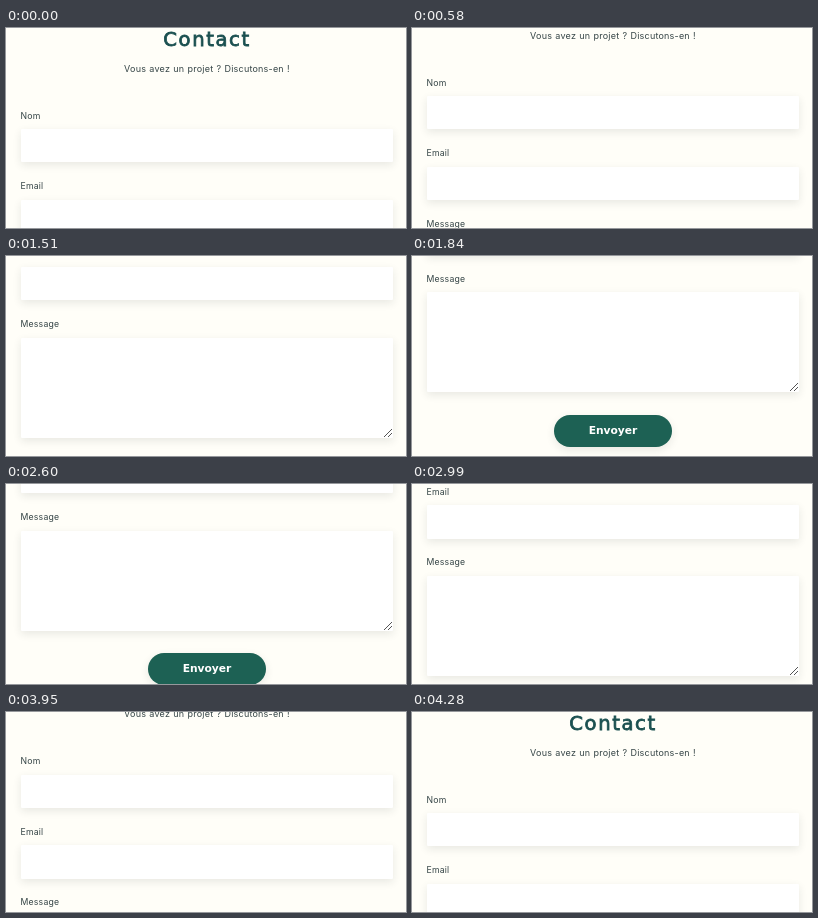
These frames come from a looping animation (400 by 200 pixels, 4.65 s). An HTML page:

```html
<!DOCTYPE html>
<html lang="fr">
<head>
<meta charset="utf-8">
<title>Contact</title>
<style>
  html, body {
    margin: 0;
    width: 100%;
    height: 100%;
    overflow: hidden;
    background: #fffef8;
  }
  .stage {
    position: relative;
    width: 400px;
    height: 200px;
    overflow: hidden;
    background: #fffef8;
    color: #354446;
    font: 8.7px/14px Inter, sans-serif;
    letter-spacing: .2px;
  }
  .page {
    position: absolute;
    top: 0;
    left: 0;
    width: 400px;
    height: 406px;
    animation: scroll 4650ms infinite;
  }
  .page > * {
    position: absolute;
    margin: 0;
    white-space: nowrap;
  }
  h1, p {
    left: 0;
    width: 402px;
    text-align: center;
  }
  h1 {
    top: 0;
    color: #1b5050;
    font: 400 19.6px/24px "DejaVu Sans", sans-serif;
    letter-spacing: 1.6px;
    -webkit-text-stroke: .8px;
  }
  p {
    top: 33.5px;
    font-size: 9px;
    word-spacing: .5px;
  }
  label { left: 14.5px; }
  .field {
    left: 14.5px;
    width: 372.5px;
    height: 33.4px;
    background: #fff;
    border-radius: 1px;
    box-shadow: 0 3px 9px rgba(30, 40, 40, .1);
  }
  .area { height: 100px; }
  .area svg {
    position: absolute;
    right: 0;
    bottom: 0;
  }
  .send {
    top: 365px;
    left: 142px;
    width: 118px;
    height: 32px;
    border-radius: 16px;
    background: #1d6154;
    box-shadow: 0 3px 9px rgba(30, 40, 40, .1);
    color: #fff;
    font: 700 10.7px/32px "DejaVu Sans", sans-serif;
    letter-spacing: 0;
    text-align: center;
  }
  /* Constant speed, one step every 30 ms */
  @keyframes scroll {
    0% { top: 0; animation-timing-function: step-end; }
    7.29032% { top: 0; animation-timing-function: steps(50); }
    39.54839% { top: -206px; animation-timing-function: step-end; }
    53.95699% { top: -206px; animation-timing-function: steps(59); }
    92.02151%, 100% { top: 0; }
  }
</style>
</head>
<body>
<div class="stage">
  <div class="page">
    <h1>Contact</h1>
    <p>Vous avez un projet ? Discutons-en !</p>
    <label style="top:80.5px">Nom</label>
    <div class="field" style="top:101px"></div>
    <label style="top:151px">Email</label>
    <div class="field" style="top:171.6px"></div>
    <label style="top:221.5px">Message</label>
    <div class="field area" style="top:242.4px">
      <svg width="10" height="10" fill="none" stroke="#555"><path d="M1 9 9 1M5 9 9 5"/></svg>
    </div>
    <div class="send">Envoyer</div>
  </div>
</div>
</body>
</html>
```
